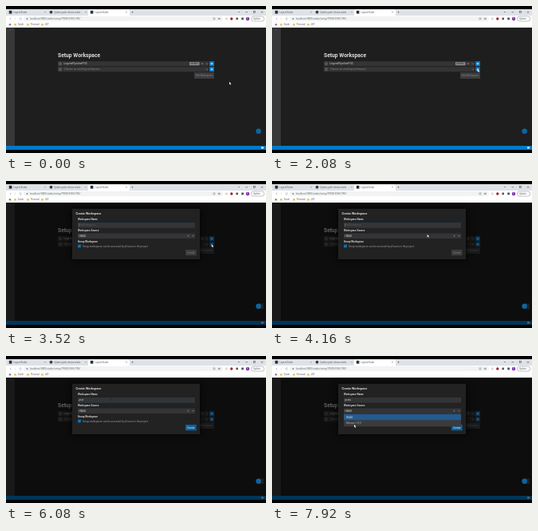
These frames come from a looping animation (326 by 184 pixels, 8000 ms). An HTML page with a canvas:

```html
<!DOCTYPE html>
<html lang="en">
<head>
<meta charset="utf-8">
<title>Setup Workspace</title>
<style>
html, body { margin: 0; width: 100%; height: 100%; overflow: hidden; background: #000; }
canvas { display: block; width: 326px; height: 184px; }
</style>
</head>
<body>
<canvas id="stage"></canvas>
<script>
const W = 326, H = 184, LOOP = 8000;
const canvas = document.getElementById('stage');
const ctx = canvas.getContext('2d');
const dpr = window.devicePixelRatio || 1;
canvas.width = W * dpr;
canvas.height = H * dpr;

const BLUE = '#007acc', SOFT_BLUE = '#0b63a2', BODY = '#1e1e1e', FIELD = '#343436';

function rect(x, y, w, h, color, radius = 0) {
  ctx.fillStyle = color;
  ctx.beginPath();
  ctx.roundRect(x, y, w, h, radius);
  ctx.fill();
}

function disc(x, y, r, color) {
  ctx.fillStyle = color;
  ctx.beginPath();
  ctx.arc(x, y, r, 0, 7);
  ctx.fill();
}

function line(points, color, width = 0.5) {
  ctx.strokeStyle = color;
  ctx.lineWidth = width;
  ctx.beginPath();
  points.forEach(([x, y]) => ctx.lineTo(x, y));
  ctx.stroke();
}

function text(str, x, y, size, color, weight = 400, align = 'left') {
  ctx.font = `${weight} ${size}px Roboto, sans-serif`;
  ctx.textAlign = align;
  ctx.fillStyle = color;
  ctx.fillText(str, x, y);
}

function cross(x, y, r, color) {
  line([[x - r, y - r], [x + r, y + r]], color);
  line([[x - r, y + r], [x + r, y - r]], color);
}

function plus(x, y, r, color, width = 0.7) {
  line([[x - r, y], [x + r, y]], color, width);
  line([[x, y - r], [x, y + r]], color, width);
}

function caret(x, y, color) {
  line([[x - 1, y - 0.5], [x, y + 0.5], [x + 1, y - 0.5]], color);
}

function tab(x, title, active, round) {
  if (active) rect(x - 2, 4.5, 52, 8, '#fff', [2, 2, 0, 0]);
  if (round) disc(x + 2.5, 7.7, 1.9, '#3a3f45');
  else rect(x + 0.8, 5.8, 3.6, 3.8, '#2a313a');
  text(title, x + 6.5, 8.7, 2.65, '#5f6368');
  cross(x + 46, 7.7, 0.7, '#777b80');
}

function browser() {
  rect(0, 4, W, 8, '#dee1e6');
  tab(3, 'Legend Studio');
  tab(54, 'Update guide release studio', false, true);
  tab(105, 'Legend Studio', true);
  plus(158.5, 7.7, 1.2, '#5f6368', 0.5);
  caret(292, 7.5, '#444');
  line([[300.5, 7.7], [303, 7.7]], '#333');
  ctx.strokeRect(310.5, 6.5, 2.2, 2.2);
  cross(321, 7.7, 1.1, '#444');

  rect(0, 12, W, 15.2, '#fff');
  rect(22, 12.8, 250, 6.2, '#f1f3f4', 3.1);
  line([[6.3, 14.8], [5, 16], [6.3, 17.2]], '#80868b');
  line([[10.9, 14.8], [12.2, 16], [10.9, 17.2]], '#c4c7ca');
  ctx.beginPath();
  ctx.arc(18.5, 16, 1.3, 0.5, 5.8);
  ctx.strokeStyle = '#80868b';
  ctx.stroke();
  disc(26.5, 16, 1, '#80868b');
  text('localhost:9000/studio/setup/PROD-39861785/', 30, 17, 3.05, '#6a6e73');
  ctx.strokeRect(260, 14.9, 2, 2);
  line([[266, 17], [267.3, 14.6], [268.6, 17], [265.7, 15.5], [268.9, 15.5], [266, 17]], '#80868b', 0.4);
  disc(276.3, 16, 1.7, '#ead5cc');
  disc(282.8, 16, 1.7, '#a3232c');
  rect(288.4, 14.5, 2.6, 2.8, '#54585c', 0.6);
  rect(295.2, 14.5, 2.8, 2.8, '#54585c');
  disc(303, 16, 2.2, '#7b1fa2');
  text('E', 303, 17, 2.8, '#fff', 400, 'center');
  ctx.strokeStyle = '#80868b';
  ctx.lineWidth = 0.5;
  ctx.beginPath();
  ctx.roundRect(307.3, 13, 16.5, 6, 3);
  ctx.stroke();
  text('Update', 310, 17, 2.8, '#5f6368');

  disc(5, 23.3, 1.3, '#85898d');
  [['Guide', 10], ['Personal', 26], ['LDF', 44]].forEach(([name, x]) => {
    rect(x, 22, 3, 2.6, '#ecc964', 0.4);
    text(name, x + 4.8, 24.4, 2.8, '#5f6368');
  });
}

function selectorRow(y, label, color, hover) {
  rect(65, y, 6, 6, '#3a3a3c');
  line([[67, y + 1.8], [69, y + 1.8], [69, y + 4.2], [67, y + 4.2], [67, y + 1.8]], '#8a8a8a');
  rect(71.2, y, 183, 6, FIELD);
  text(label, 72.5, y + 4.1, 3.35, color);
  caret(252, y + 3, '#bbb');
  rect(255, y, 6, 6, hover ? SOFT_BLUE : BLUE);
  plus(258, y + 3, 1.5, '#fff');
}

function setupPage(t) {
  rect(0, 27.2, W, 152.8, BODY);
  rect(0, 27.2, 11, 148, '#383838');
  line([[4, 30], [7, 30]], '#555');
  text('Setup Workspace', 65, 64.2, 6.75, '#dcdcdc', 700);
  selectorRow(69.2, 'LegendPipelinePOC', '#d0d0d0', t > 1200 && t < 2000);
  rect(230, 70.2, 12.5, 4, '#8c8c8e', 0.6);
  text('sandbox', 231, 73.2, 2.6, '#222');
  cross(246, 72.2, 0.8, '#bbb');
  selectorRow(76.2, 'Choose an existing workspace', '#858585', t > 2000);
  rect(236, 83.2, 25, 7.8, '#3c3c3e');
  text('Edit Workspace', 248.5, 88.2, 3.1, '#858585', 400, 'center');
  rect(0, 175, W, 5, BLUE);
  rect(320, 176.2, 3, 2.4, '#d7ecfa', 0.4);
}

function assistant(t) {
  rect(317, 153.3, 6, 6.7, BODY);
  disc(316.6, 156.8, 3.2, '#0b69ad');
  const eye = t % 1280 > 1120 ? 0.2 : 0.7;
  rect(315.1, 156 - eye / 2, 0.6, eye, '#083b60');
  rect(317.4, 156 - eye / 2, 0.6, eye, '#083b60');
  ctx.beginPath();
  ctx.arc(316.6, 156.9, 1.3, 0.4, 2.7);
  ctx.strokeStyle = '#083b60';
  ctx.lineWidth = 0.4;
  ctx.stroke();
}

const KEY_TIMES = [5120, 5360, 5600, 5920, 6240];
const NAME = 'proto';
const OPEN_AT = 7200;

function modal(t) {
  const typed = NAME.slice(0, KEY_TIMES.filter(k => t >= k).length);
  const focused = t < 6900;
  ctx.shadowColor = '#000';
  ctx.shadowBlur = 8 * dpr;
  rect(83, 34.8, 160, 63.2, '#222223');
  ctx.shadowBlur = 0;
  text('Create Workspace', 87.5, 42.2, 3.9, '#e0e0e0', 700);
  text('Workspace Name', 90, 49.2, 3.15, '#d6d6d6', 700);
  rect(90, 52, 147, 6.4, FIELD);
  if (focused) {
    ctx.strokeStyle = '#1f394b';
    ctx.lineWidth = 0.5;
    ctx.strokeRect(90.2, 52.2, 146.6, 6);
  }
  text(typed || 'MyWorkspace', 91.5, 56.3, 3.3, typed ? '#d4d4d4' : '#555a5e');
  if (focused && t % 1040 < 520) {
    const x = 91.6 + (typed ? ctx.measureText(typed).width : 0);
    line([[x, 53.2], [x, 57.2]], '#aaa', 0.3);
  }

  text('Workspace Source', 90, 63.2, 3.15, '#d6d6d6', 700);
  rect(90, 65.4, 147, 6.5, FIELD);
  text('HEAD', 91.5, 69.8, 3.2, '#e4e4e4');
  cross(228.5, 68.6, 0.8, '#bbb');
  caret(234.5, 68.6, '#ccc');

  text('Group Workspace', 90, 77, 3.15, '#d6d6d6', 700);
  rect(90, 79.4, 4, 4, SOFT_BLUE, 0.4);
  line([[91, 81.4], [91.8, 82.3], [93.2, 80.5]], '#8fb6d3', 0.4);
  text('Group workspaces can be accessed by all users in the project', 96, 82.6, 3, '#9a9a9a');

  rect(225, 86, 13.6, 7.2, typed ? SOFT_BLUE : '#3c3c3e');
  text('Create', 231.8, 90.8, 3.2, typed ? '#fff' : '#858585', 400, 'center');

  if (t >= OPEN_AT) {
    rect(90, 72.6, 147, 15.6, '#333335');
    rect(90, 72.8, 147, 7.8, '#245b8f');
    if (t > 7840) rect(90, 80.6, 147, 7.4, '#3b3b3d');
    text('HEAD', 93, 77.9, 3.2, '#e4e4e4');
    text('Release 1.0.0', 93, 85.4, 3.1, '#b8b8b8');
  }
}

// Each stop: time, x, y of the pointer tip.
const PATH = [
  [0, 280, 95], [480, 280, 95], [1280, 259, 75.5], [1440, 258.5, 75],
  [2160, 257.8, 79.5], [3760, 257.8, 79.5], [4560, 132, 54.5],
  [6480, 132, 54.5], [7120, 118, 68], [7200, 118, 68], [7920, 103, 86], [LOOP, 103, 86]
];

function pointer(t) {
  const i = PATH.findIndex(p => p[0] > t);
  const [t0, x0, y0] = PATH[i - 1], [t1, x1, y1] = PATH[i];
  const u = (t - t0) / (t1 - t0), e = u * u * (3 - 2 * u);
  const x = x0 + (x1 - x0) * e, y = y0 + (y1 - y0) * e;
  if (t > 4400 && y < 58) {
    line([[x, y - 1.8], [x, y + 1.8]], '#161616', 0.4);
    return;
  }
  ctx.save();
  ctx.translate(x, y);
  ctx.fillStyle = '#fff';
  ctx.fill(new Path2D('M0 0V3.2L.8 2.5 1.4 3.8 2 3.5 1.4 2.3H2.4Z'));
  ctx.restore();
}

function draw(t) {
  ctx.setTransform(dpr, 0, 0, dpr, 0, 0);
  rect(0, 0, W, H, '#000');
  browser();
  setupPage(t);
  const shown = Math.min(1, Math.max(0, (t - 3440) / 80));
  if (shown) {
    ctx.globalAlpha = shown;
    rect(0, 27.2, W, 152.8, 'rgba(0,0,0,.56)');
    modal(t);
    ctx.globalAlpha = 1;
  }
  assistant(t);
  pointer(t);
}

function tick() {
  draw(performance.now() % LOOP);
  requestAnimationFrame(tick);
}
tick();
</script>
</body>
</html>
```
